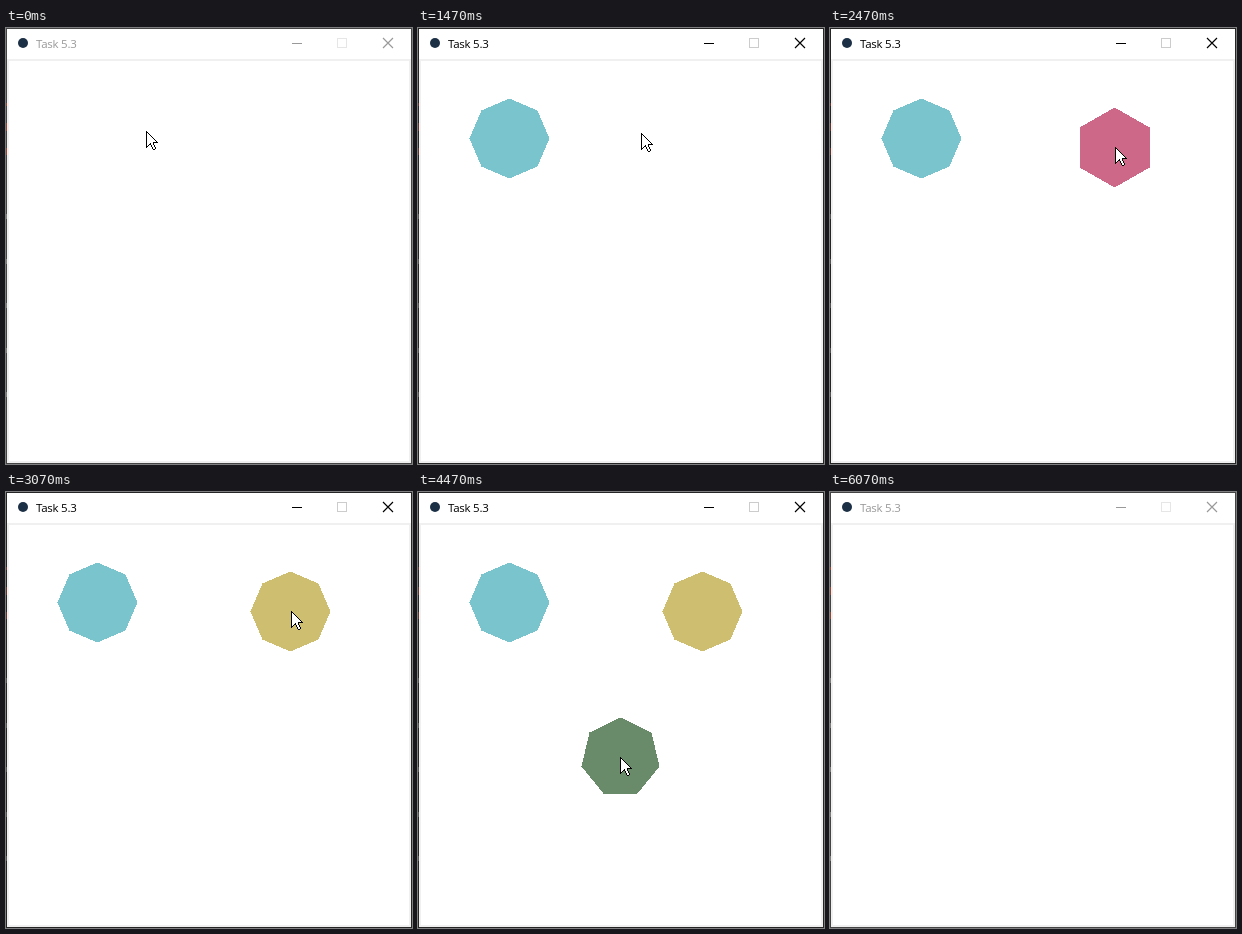
An HTML page for the animation above (6.14 s loop, 406x436 px).

```html
<!DOCTYPE html>
<html lang="en">
<head>
<meta charset="utf-8">
<title>Task 5.3</title>
<style>
  html, body { margin: 0; width: 100%; height: 100%; overflow: hidden; background: #fff; }
  svg { display: block; width: 406px; height: 436px; }
  .window { --ink: #000; --faint: #ccc; --edge: #252525; --speck: .45; }
  .window.idle { --ink: #999; --faint: #e6e6e6; --edge: #444; --speck: .8; }
  .title { font: 11.5px "Open Sans", "Noto Sans", sans-serif; letter-spacing: -.25px; fill: var(--ink); }
  .edge { fill: none; stroke: var(--edge); }
  .button { fill: none; stroke: var(--ink); }
  .faint { stroke: var(--faint); }
  .close { stroke-width: 1.15; }
  .specks { opacity: var(--speck); }
  .crisp { shape-rendering: crispEdges; }
</style>
</head>
<body>
<svg viewBox="0 0 406 436">
  <g id="window" class="window idle">
    <rect width="406" height="436" fill="#fff"/>
    <rect class="crisp" x="2" y="32" width="402" height="402" fill="none" stroke="#f0f0f0" stroke-width="2"/>
    <rect class="edge crisp" x=".5" y=".5" width="405" height="435"/>
    <g class="specks crisp">
      <path d="M.5 75v3m0 17v8m0 17v7" stroke="#a8442c"/>
      <path d="M.5 186v186" stroke="#8a8a84" stroke-dasharray="5 39.5"/>
    </g>
    <circle cx="17" cy="15" r="5" fill="#1b2f45"/>
    <text class="title" x="30" y="20">Task 5.3</text>
    <path class="button crisp" d="M286 15.5h10"/>
    <rect class="button faint crisp" x="331.5" y="10.5" width="9" height="9"/>
    <path class="button close" d="M377 10l10 10M387 10l-10 10"/>
  </g>
  <g id="shapes" class="crisp" transform="translate(.5 .5)"></g>
  <path id="cursor" class="crisp" d="M.5 .5V16.5L4.5 12.5L6.5 17.5L7.5 18.5H8.5L9.5 17.5L7.5 12.5V11.5H11.5Z" fill="#fff" stroke="#000"/>
</svg>
<script>
  const LOOP = 6140, STEP = 1000 / 15, RADIUS = 40;
  const FOCUS = 330, CLEAR = 5070, EXIT = 5930, BLUR = 6070;

  // Each click replaces the shape with one that has one more side, starting at four.
  const spots = [
    { x: 91, y: 110, clicks: [470, 670, 870, 1130, 1270],
      colors: ["#cd853f", "#6e8b3d", "#a2b5cd", "#cd96cd", "#7ac5cd"] },
    { x: 284, y: 119, clicks: [2000, 2200, 2470, 2670, 3070],
      colors: ["#ebebeb", "#6ca6cd", "#cd6889", "#66cdaa", "#cdbe70"] },
    { x: 202, y: 265, clicks: [3730, 3930, 4200, 4470],
      colors: ["#68838b", "#8b0a50", "#cdad00", "#698b69"] }
  ];

  // The pointer follows one quadratic curve per move: start, bend, end.
  const rest = [[140, 103], [91, 110], [285, 119], [202, 265], [68, 404]];
  const moves = [
    { from: 0, to: 267, bend: [91, 110] },
    { from: 1333, to: 1800, bend: [376, 95] },
    { from: 3133, to: 3467, bend: [105, 270] },
    { from: 5600, to: 5867, bend: [195, 275] }
  ];

  const byId = id => document.getElementById(id);
  const win = byId("window"), cursor = byId("cursor"), layer = byId("shapes");

  function ngon(cx, cy, sides) {
    return Array.from({ length: sides }, (_, i) => {
      const a = 2 * Math.PI * i / sides;
      return [Math.round(cx + RADIUS * Math.sin(a)), Math.round(cy - RADIUS * Math.cos(a))];
    }).join(" ");
  }

  const shapes = spots.flatMap(({ x, y, clicks, colors }) => clicks.map((from, i) => {
    const el = document.createElementNS("http://www.w3.org/2000/svg", "polygon");
    el.setAttribute("points", ngon(x, y, i + 4));
    el.setAttribute("fill", colors[i]);
    layer.append(el);
    return { el, from, to: clicks[i + 1] ?? CLEAR };
  }));

  // The screen was sampled 15 times a second, so the pointer moves in whole steps.
  function pointerAt(t) {
    const now = Math.floor((t + 4) / STEP) * STEP;
    const i = moves.findLastIndex(m => m.from <= now);
    const { from, to, bend } = moves[i];
    const u = Math.min(1, (now - from) / (to - from)), v = 1 - u;
    return bend.map((b, k) => Math.round(v * v * rest[i][k] + 2 * u * v * b + u * u * rest[i + 1][k]));
  }

  const show = (el, on) => el.setAttribute("visibility", on ? "visible" : "hidden");

  function draw(t) {
    win.classList.toggle("idle", t < FOCUS || t >= BLUR);
    for (const { el, from, to } of shapes) show(el, t >= from && t < to);
    cursor.setAttribute("transform", `translate(${pointerAt(t)})`);
    show(cursor, t < EXIT);
  }

  const start = performance.now();
  function tick() {
    draw((performance.now() - start) % LOOP);
    requestAnimationFrame(tick);
  }
  tick();
</script>
</body>
</html>
```
